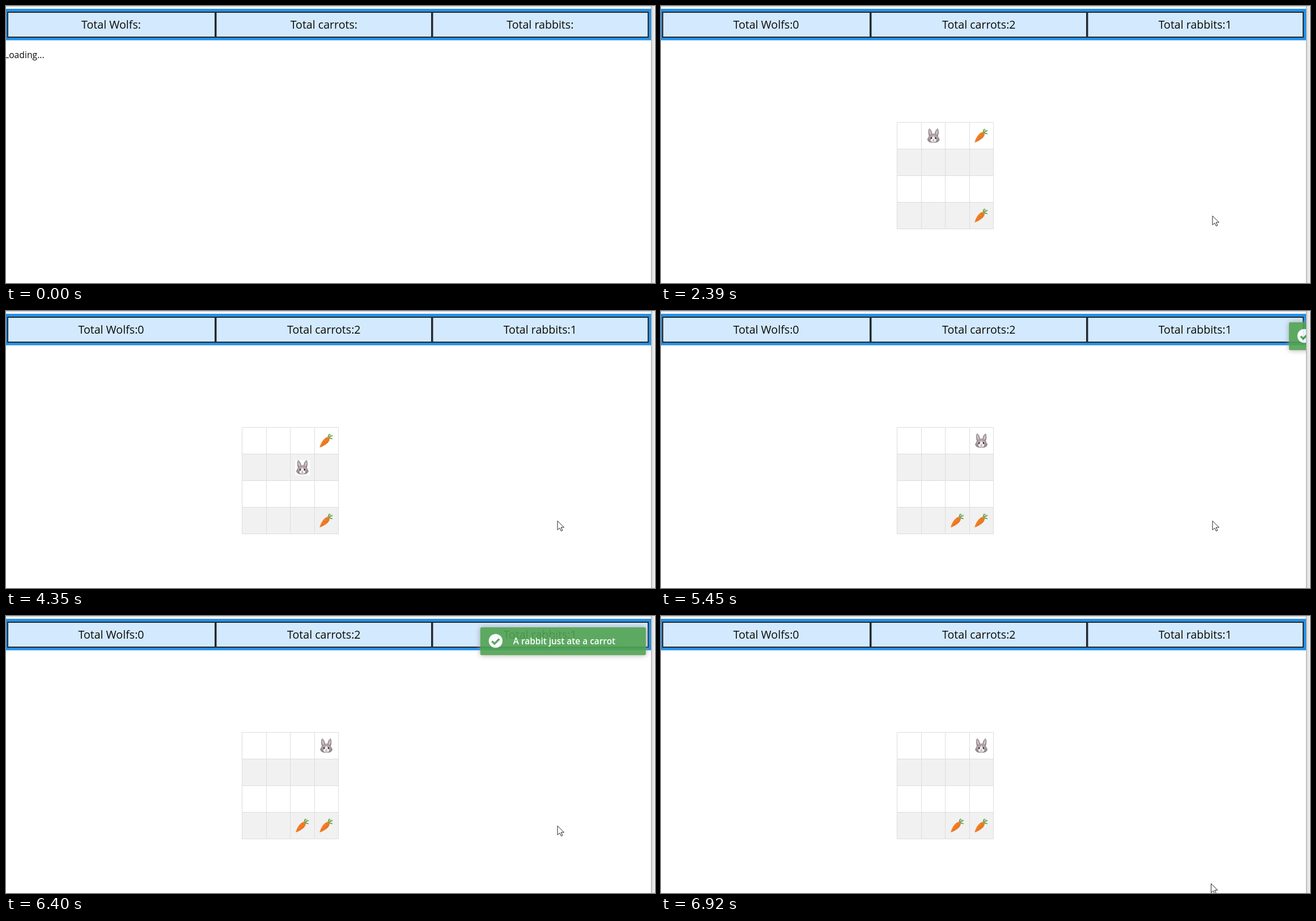
An HTML page for the animation above (8 s loop, 1145 px wide and 489 px high).

```html
<!DOCTYPE html>
<html lang="en">
<head>
<meta charset="utf-8">
<title>Rabbit field</title>
<style>
  html, body { margin: 0; width: 100%; height: 100%; overflow: hidden; background: #fff; }
  svg { display: block; width: 100%; height: 100%; }
  text { font-family: "Open Sans", "Noto Sans", sans-serif; fill: #0a0a0a; }
  .total { font-size: 19.6px; text-anchor: middle; }
  .cell { fill: #d3e9fd; stroke: #24292e; stroke-width: 2; }
</style>
</head>
<body>
<svg viewBox="0 0 1145 489" preserveAspectRatio="none">
  <defs>
    <linearGradient id="edge">
      <stop offset="0" stop-color="#cfcfcf"/>
      <stop offset="1" stop-color="#f6f6f6"/>
    </linearGradient>
    <linearGradient id="fur" x2="0" y2="1">
      <stop offset="0" stop-color="#b5abb0"/>
      <stop offset="1" stop-color="#8d8287"/>
    </linearGradient>
    <linearGradient id="root" x2="1" y2="1">
      <stop offset="0" stop-color="#fa9a3c"/>
      <stop offset="1" stop-color="#e4600f"/>
    </linearGradient>
    <filter id="glow" x="-10%" y="-40%" width="120%" height="180%">
      <feDropShadow dx="0" dy="0" stdDeviation="5" flood-color="#999"/>
    </filter>
    <clipPath id="tray"><path d="M818 0H1138V489H818Z"/></clipPath>

    <g id="bunny">
      <rect x="-12.5" y="-13" width="26" height="27" fill="#fff"/>
      <g fill="url(#fur)" stroke="#756a70" stroke-width=".6">
        <path d="M-7.5 0C-9.5-5-9-10-7.5-12.5C-4.5-11-2.5-7-2.5-1Z"/>
        <path d="M7.5 0C9.5-5 9-10 7.5-12.5C4.5-11 2.5-7 2.5-1Z"/>
        <path d="M0-3.2C5-3.2 8-.5 8.5 3C10.5 5 11 7 9.5 9C8 11.5 4 12 0 12C-4 12-8 11.5-9.5 9C-11 7-10.5 5-8.5 3C-8-.5-5-3.2 0-3.2Z"/>
      </g>
      <path d="M-6.3-2C-7.6-5-7.5-8-6.9-10C-5-8-4-5-4-2ZM6.3-2C7.6-5 7.5-8 6.9-10C5-8 4-5 4-2Z" fill="#d9c3c8"/>
      <path d="M0 0C2 3 3 5 5.5 7.5C5 10.5 3 11.5 0 11.5C-3 11.5-5 10.5-5.5 7.5C-3 5-2 3 0 0Z" fill="#f3eff0"/>
      <g fill="#ded5d8"><circle cx="-4" cy="3.8" r="2.4"/><circle cx="4" cy="3.8" r="2.4"/></g>
      <g fill="#29231f"><ellipse cx="-4" cy="4" rx="1.4" ry="1.8"/><ellipse cx="4" cy="4" rx="1.4" ry="1.8"/></g>
      <path d="M-1.5 6.3H1.5L0 8Z" fill="#b77880"/>
      <path d="M0 8V9.3M-2 9.3Q-1 10.3 0 9.3Q1 10.3 2 9.3" fill="none" stroke="#7d6d70" stroke-width=".7"/>
    </g>

    <g id="carrot">
      <g fill="none" stroke="#5b9940" stroke-width="1.7" stroke-linecap="round">
        <path d="M3.5-4.5Q3-9 5.5-11.5M4-4.5Q7-8 10.5-9M4-4.5Q8-4.5 10-3.5"/>
        <path d="M4-5L8-11" stroke="#79b356" stroke-width="1.2"/>
      </g>
      <path d="M-11.7 12C-10.5 5-5-4.5 1-6.3C4-7 6.5-3.8 5.5-.8C3 5-6 10.5-11.7 12Z" fill="url(#root)"/>
      <path d="M-5 1L-2 3M-1-4L1.5-2M-7 6L-5 7.5M1 2L3 3.2" stroke="#c9550f" stroke-width=".8"/>
    </g>
  </defs>

  <rect width="1145" height="489" fill="#fff"/>
  <path d="M0 0H1145V5H0Z" fill="#f5f5f5"/>
  <path d="M0 .5H1145" stroke="#c6c6c6"/>
  <path d="M0 5H1138V60.500H0Z" fill="#2490e6"/>
  <g id="totals"></g>
  <text id="loading" x="-3" y="92" font-size="15.700">Loading...</text>

  <g id="field">
    <path d="M416.500 252.500H586.500V299.500H416.500ZM416.500 346.500H586.500V393.500H416.500Z" fill="#f1f1f1"/>
    <path id="lines" fill="none" stroke="#ddd"/>
    <use id="eaten" href="#carrot"/>
    <use id="lower" href="#carrot"/>
    <use id="rabbit" href="#bunny"/>
  </g>

  <g clip-path="url(#tray)">
    <g id="toast">
      <g opacity=".9">
        <rect y="20" width="292" height="49" rx="2" fill="#51a351" filter="url(#glow)"/>
        <circle cx="27" cy="44" r="12.200" fill="#fff"/>
        <path d="M20.500 44.500L25 49L33.500 40.500" fill="none" stroke="#51a351" stroke-width="3.600"/>
        <text x="58" y="50" font-size="15.400" font-weight="600" style="fill:#fff">A rabbit just ate a carrot</text>
      </g>
    </g>
  </g>

  <path d="M1138 0H1145V489H1138Z" fill="url(#edge)"/>
  <path d="M1138.500 0V489" stroke="#aaa"/>
  <path id="cursor" d="M.5 .5V16.500L4.300 13L7 18.500L9.400 17.400L6.800 12H12Z" fill="#fff" stroke="#222"/>
</svg>

<script>
const LOOP = 8000;
const COL = 42.5, ROW = 47, LEFT = 416.5, TOP = 205.5;
const TOAST_X = 832, TOAST_W = 292, SLIDE = 400;
const $ = id => document.getElementById(id);
const show = (el, on) => el.setAttribute('visibility', on ? 'visible' : 'hidden');
const move = (el, x, y) => el.setAttribute('transform', `translate(${x} ${y})`);
const clamp = v => Math.min(1, Math.max(0, v));
const mix = (a, b, k) => a + (b - a) * k;

const totals = [
  { name: 'Total Wolfs:', count: 0, x: 3, end: 369, mid: 185.5 },
  { name: 'Total carrots:', count: 2, x: 370.5, end: 751, mid: 560.8 },
  { name: 'Total rabbits:', count: 1, x: 752.5, end: 1133, mid: 942.3 }
];
$('totals').innerHTML = totals.map(c =>
  `<rect class="cell" x="${c.x}" y="11" width="${c.end - c.x}" height="44"/>
   <text class="total" x="${c.mid}" y="39.8"></text>`).join('');
const labels = document.querySelectorAll('.total');

let grid = '';
for (let i = 0; i < 5; i++) {
  const x = Math.floor(LEFT + i * COL) + .5;
  grid += `M${x} ${TOP}V${TOP + 4 * ROW}M${LEFT} ${TOP + i * ROW}H${LEFT + 4 * COL}`;
}
$('lines').setAttribute('d', grid);

// Time, column and row of each hop
const hops = [[0, 0, 0], [1390, 0, 1], [2390, 1, 0], [3420, 1, 1], [4350, 2, 1], [5360, 3, 0]];

function place(el, col, row) {
  move(el, 438.5 + col * 42.2, 229 + row * ROW);
}

// Fraction of the span a..b, held over n discrete updates
function held(t, a, b, n) {
  return clamp(Math.floor((t - a) / (b - a) * (n - 1) + 1e-6) / (n - 1));
}

// CSS "ease": cubic-bezier(.25, .1, .25, 1)
function ease(x) {
  if (x <= 0 || x >= 1) return clamp(x);
  const curve = (s, p, q) => 3 * (1 - s) ** 2 * s * p + 3 * (1 - s) * s * s * q + s ** 3;
  let lo = 0, hi = 1;
  for (let i = 0; i < 24; i++) {
    const s = (lo + hi) / 2;
    if (curve(s, .25, .25) < x) lo = s; else hi = s;
  }
  return curve(lo, .1, 1);
}

function drawToast(t) {
  const enter = mix(5360, 5830, held(t, 5360, 5830, 7));
  const leave = mix(6400, 6920, held(t, 6400, 6920, 8));
  const shift = t < 6400
    ? 1 - ease((enter - 5410) / SLIDE)
    : ease((leave - 6388) / SLIDE);
  show($('toast'), shift < 1);
  move($('toast'), TOAST_X + TOAST_W * shift, 0);
}

function drawCursor(t) {
  const up = held(t, 910, 1140, 4);
  const down = held(t, 6690, 6920, 4);
  show($('cursor'), t >= 910);
  move($('cursor'), mix(mix(1027.5, 972.5, up), 970, down), mix(mix(460, 370, up), 472, down));
}

function draw(t) {
  const loaded = t >= 380;
  totals.forEach((c, i) => labels[i].textContent = c.name + (loaded ? c.count : ''));
  show($('loading'), !loaded);
  show($('field'), loaded);
  const [, col, row] = hops.filter(h => t >= h[0]).pop();
  place($('rabbit'), col, row);
  place($('eaten'), t < 5360 ? 3 : 2, t < 5360 ? 0 : 3);
  place($('lower'), 3, 3);
  drawToast(t);
  drawCursor(t);
}

const start = performance.now();
function tick() {
  draw((performance.now() - start) % LOOP);
  requestAnimationFrame(tick);
}
tick();
</script>
</body>
</html>
```
